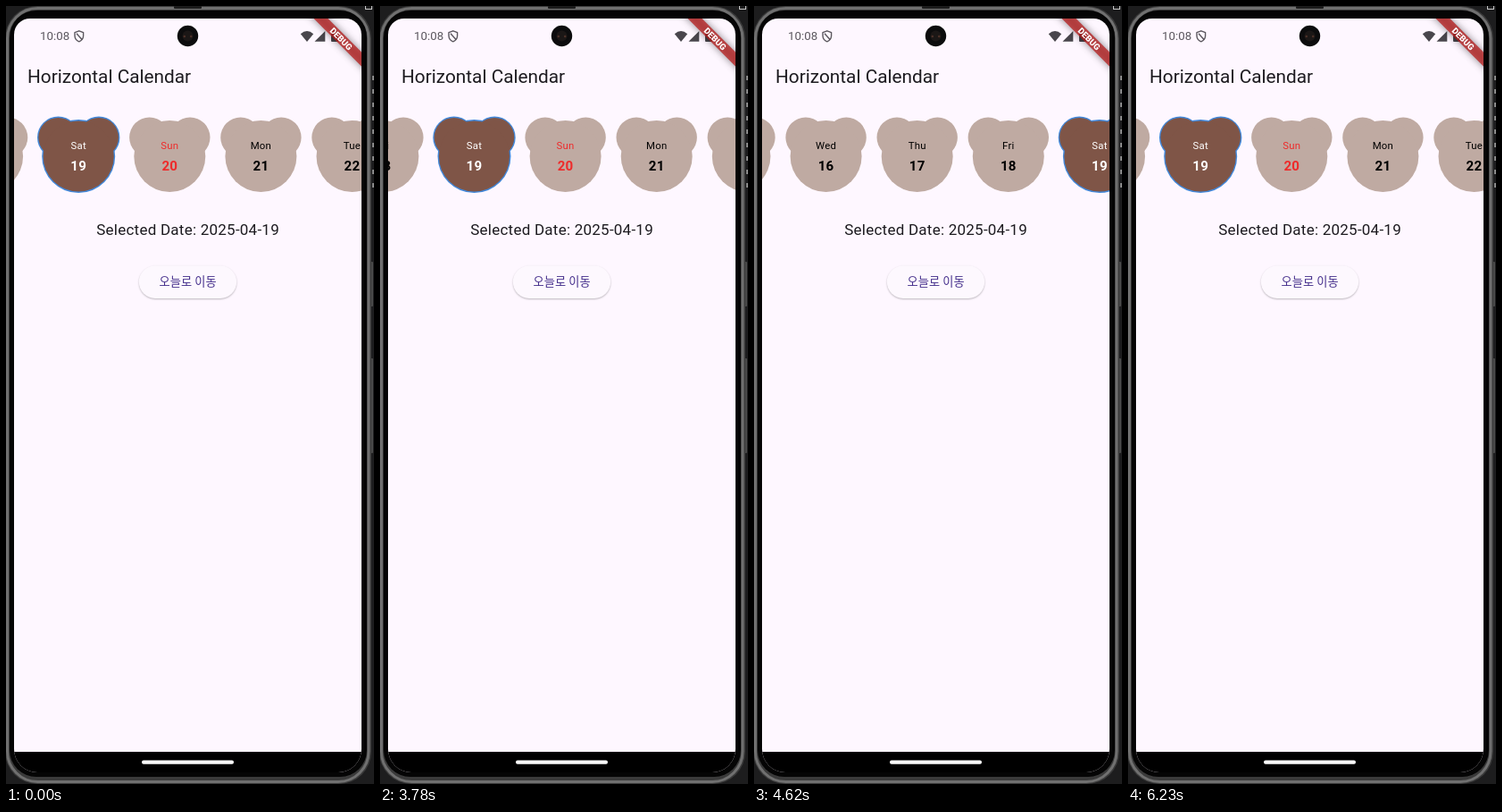
Animation of 412x870 px, one loop 6370 ms. Source, as an HTML page with a canvas:

```html
<!DOCTYPE html>
<html lang="en">
<head>
<meta charset="utf-8">
<title>Horizontal Calendar</title>
<style>
  html, body { margin: 0; width: 100%; height: 100%; overflow: hidden; background: #1d1d1e; }
  canvas { display: block; width: 412px; height: 870px; }
</style>
</head>
<body>
<canvas id="stage"></canvas>
<script>
const W = 412, H = 870, LOOP = 6370, STEP = 70;
const SURFACE = '#fef7ff', INK = '#1d1b20';
const SCREEN = { x: 9, y: 14, w: 389, h: 843 };
const FIRST_X = 81.2, PITCH = 102.1, TODAY = 19, TRAVEL = 305.7;
const DAYS = ['Sun', 'Mon', 'Tue', 'Wed', 'Thu', 'Fri', 'Sat'];

const canvas = document.getElementById('stage');
const ratio = window.devicePixelRatio || 1;
canvas.width = W * ratio;
canvas.height = H * ratio;
const ctx = canvas.getContext('2d');

const clamp = v => Math.min(1, Math.max(0, v));
const progress = (t, start, length) => clamp((t - start) / length);

function pill(x, y, w, h, r, color) {
  ctx.beginPath();
  ctx.roundRect(x, y, w, h, r);
  if (color) {
    ctx.fillStyle = color;
    ctx.fill();
  }
}

function disc(x, y, r, color) {
  ctx.beginPath();
  ctx.arc(x, y, r, 0, Math.PI * 2);
  ctx.fillStyle = color;
  ctx.fill();
}

function polygon(points, color) {
  ctx.beginPath();
  points.forEach(([x, y]) => ctx.lineTo(x, y));
  ctx.closePath();
  ctx.fillStyle = color;
  ctx.fill();
}

function label(text, x, y, font, color, align = 'center', spacing = 0) {
  ctx.font = font;
  ctx.letterSpacing = spacing + 'px';
  ctx.textAlign = align;
  ctx.textBaseline = 'alphabetic';
  ctx.fillStyle = color;
  ctx.fillText(text, x, y);
}

// Motion

function scrollAt(t) {
  if (t < 3780) return 0;
  if (t < 4130) return 24.3 + 186.7 * progress(t, 3780, 350);
  if (t < 5670) {
    const left = 1 - progress(t, 4130, 370);
    return TRAVEL - (TRAVEL - 211) * left * left;
  }
  const u = progress(t, 5720, 241);
  return TRAVEL * (1 - u * u * (3 - 2 * u));
}

function pressAt(t) {
  if (t < 5670 || t >= 6230) return 0;
  return t < 5810 ? 0.5 + 0.5 * progress(t, 5670, 140) : 1 - 0.9 * progress(t, 5810, 140);
}

function selectedAt(t) {
  if (t < 420 || t >= 2800) return 19;
  return t < 1400 ? 20 : 21;
}

// The picture refreshes in even steps and rests once the row has settled.
function sampleTime(t) {
  const s = Math.floor(t / STEP) * STEP;
  if (s > 4480 && s < 4620) return 4480;
  if (s > 5950 && s < 6230) return 5950;
  return s;
}

// Phone

function drawPhone() {
  ctx.fillStyle = '#1d1d1e';
  ctx.fillRect(0, 0, W, H);
  ctx.strokeStyle = '#c8c8c8';
  ctx.lineWidth = 1;
  ctx.strokeRect(402.5, -3.5, 7, 7);
  ctx.fillStyle = '#8a8a8a';
  for (let y = 78; y < 205; y += 15) ctx.fillRect(410, y, 2, 5);
  pill(406, 286, 5, 50, 1, '#4a4a4a');
  pill(406, 394, 5, 106, 1, '#4a4a4a');

  pill(-1, 0, 410, 870, 36, '#3a3a3a');
  ctx.strokeStyle = '#707070';
  ctx.lineWidth = 3;
  pill(1.5, 2.5, 404.5, 865, 34);
  ctx.stroke();
  pill(4, 5, 400, 857, 30, '#050505');
  pill(188, 0, 31, 3, 1, '#1c1c1c');
}

// Status bar

function drawStatus() {
  const gray = '#49464c';
  label('10:08', 38, 38.3, '13.3px Roboto, sans-serif', '#5b575e', 'left');

  ctx.strokeStyle = '#5b575e';
  ctx.lineWidth = 1.4;
  ctx.lineJoin = 'round';
  ctx.beginPath();
  ctx.moveTo(81.8, 27.8);
  ctx.lineTo(86.6, 29.6);
  ctx.lineTo(86.6, 33.5);
  ctx.quadraticCurveTo(86.3, 38, 81.8, 39.8);
  ctx.quadraticCurveTo(77.3, 38, 77, 33.5);
  ctx.lineTo(77, 29.6);
  ctx.closePath();
  ctx.moveTo(79, 30.8);
  ctx.lineTo(84.8, 37.2);
  ctx.stroke();

  ctx.beginPath();
  ctx.moveTo(337, 40);
  ctx.lineTo(329.8, 31.2);
  ctx.quadraticCurveTo(337, 25, 344.2, 31.2);
  ctx.closePath();
  ctx.fillStyle = gray;
  ctx.fill();
  polygon([[345.5, 39.7], [357.3, 39.7], [357.3, 27.9]], gray);
  pill(364, 28.5, 8, 11.5, 1, gray);
  ctx.fillRect(366.2, 27, 3.5, 2);

  disc(203.5, 33.5, 11.7, '#0c0c0d');
  disc(203.5, 33.5, 6, '#1b1716');
  disc(199.8, 34, 1.3, '#4b3028');
  disc(207.2, 34, 1.3, '#4b3028');
}

function drawBanner() {
  ctx.save();
  ctx.translate(398, 14);
  ctx.rotate(Math.PI / 4);
  ctx.shadowColor = 'rgba(0,0,0,0.6)';
  ctx.shadowBlur = 8 * ratio;
  ctx.fillStyle = 'rgba(183,28,28,0.75)';
  ctx.fillRect(-46, 26.5, 92, 11.3);
  ctx.shadowColor = 'transparent';
  label('DEBUG', 0, 35.6, '900 9.6px Roboto, sans-serif', '#fff');
  ctx.restore();
}

// Calendar

function bearShape(x, grow, color) {
  disc(x - 22.7, 147, 22.5 + grow, color);
  disc(x + 22.7, 147, 22.5 + grow, color);
  disc(x, 168, 40 + grow, color);
}

function drawDay(date, x, selected) {
  const day = DAYS[(date + 1) % 7];
  const isToday = date === TODAY;
  if (isToday) bearShape(x, 1, '#4288da');
  bearShape(x, isToday ? -0.4 : 0, selected ? '#7f5547' : '#bfaaa2');

  let color = '#000';
  if (day === 'Sun') color = '#ee2b2b';
  if (isToday) color = '#2c92ee';
  if (selected) color = '#fff';
  label(day, x, 160, '11.4px Roboto, sans-serif', color, 'center', 0.24);
  label(date, x, 183.5, 'bold 15.1px Roboto, sans-serif', color, 'center', 0.24);
}

function drawCalendar(scroll, selected) {
  for (let date = 14; date <= 24; date++) {
    const x = FIRST_X + (date - TODAY) * PITCH + scroll;
    if (x > -50 && x < 460) drawDay(date, x, date === selected);
  }
}

function drawButton(press) {
  ctx.save();
  ctx.shadowColor = 'rgba(0,0,0,0.26)';
  ctx.shadowBlur = 2 * ratio;
  ctx.shadowOffsetY = ratio;
  pill(148.8, 290.3, 109.4, 36.6, 18.3, '#fdf8fe');
  ctx.restore();
  if (press > 0) {
    ctx.globalAlpha = press;
    pill(148.5, 290, 110, 37.2, 18.6, '#e5e0f3');
    ctx.globalAlpha = 1;
  }
  label('오늘로 이동', 203.6, 313, '500 13.2px "Noto Sans CJK KR", "Noto Sans CJK", "Noto Sans CJK JP", sans-serif',
    '#452f8c', 'center', 0.1);
}

function drawScreen(t) {
  ctx.save();
  pill(SCREEN.x, SCREEN.y, SCREEN.w, SCREEN.h, [18, 18, 26, 26], SURFACE);
  ctx.clip();
  const selected = selectedAt(t);
  drawStatus();
  label('Horizontal Calendar', 24, 86, '20.8px Roboto, sans-serif', INK, 'left');
  drawCalendar(scrollAt(t), selected);
  label('Selected Date: 2025-04-' + selected, 203.6, 256.2, '17px Roboto, sans-serif', INK, 'center', 0.24);
  drawButton(pressAt(t));
  drawBanner();
  ctx.fillStyle = '#000';
  ctx.fillRect(SCREEN.x, 834, SCREEN.w, 30);
  pill(152, 843.5, 103, 4.3, 2, '#fafafa');
  ctx.restore();
}

function render(now) {
  ctx.setTransform(ratio, 0, 0, ratio, 0, 0);
  drawPhone();
  drawScreen(sampleTime(now % LOOP));
}

const begin = performance.now();
function tick() {
  render(performance.now() - begin);
  requestAnimationFrame(tick);
}
tick();
</script>
</body>
</html>
```
